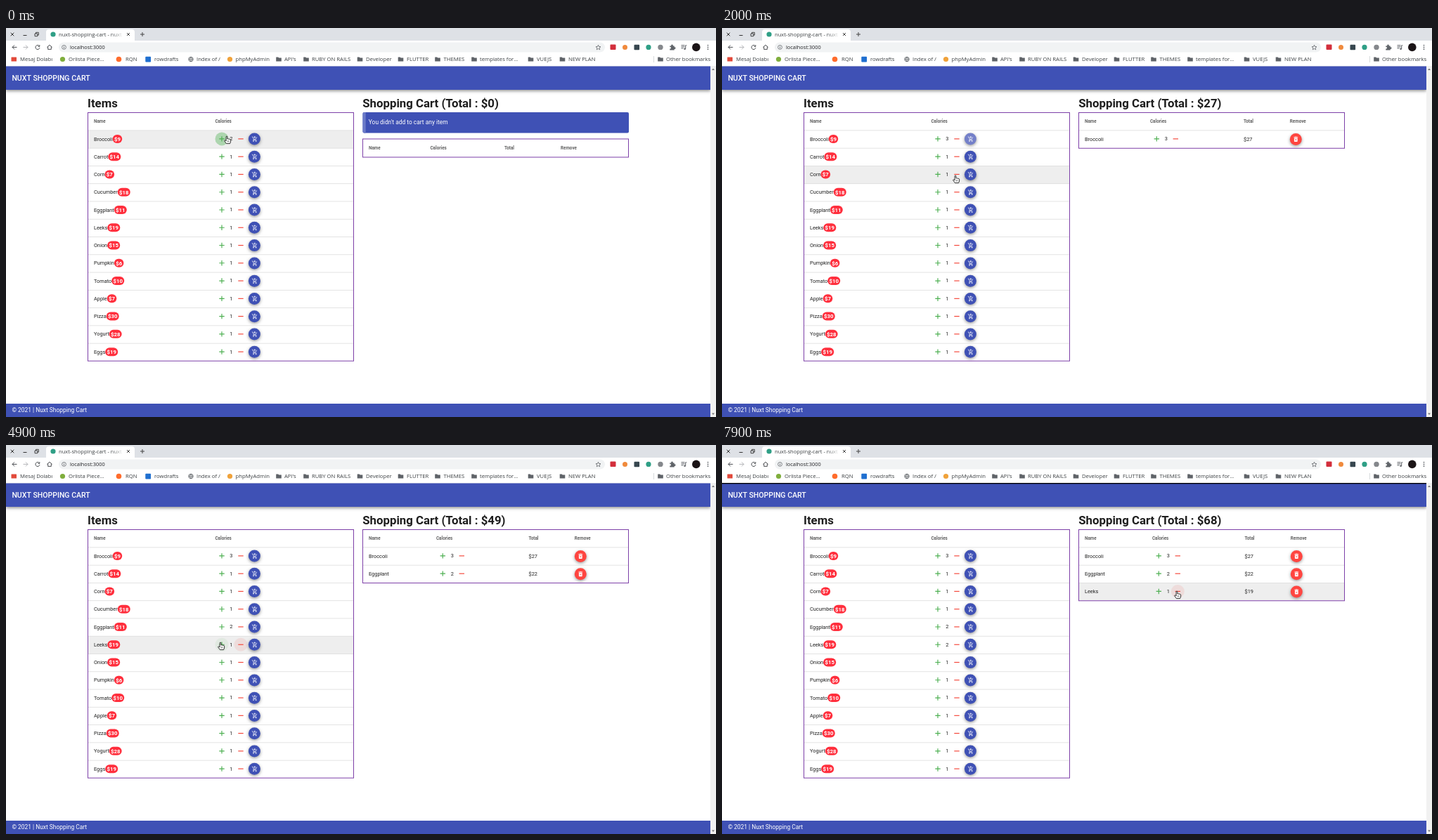
Write an HTML page with a canvas that moves like this. It is 1010 by 554 pixels and loops after 8000 ms.

```html
<!DOCTYPE html>
<html lang="en">
<head>
<meta charset="utf-8">
<title>Shopping cart</title>
<style>
html, body { margin: 0; width: 100%; height: 100%; overflow: hidden; background: #fff; }
canvas { display: block; }
</style>
</head>
<body>
<canvas id="stage" width="1010" height="554"></canvas>
<script>
const ctx = document.getElementById('stage').getContext('2d');
const LOOP = 8000, STEP = 100;
const BLUE = '#3f51b5', LIGHT = '#7480c9', GREEN = '#4caf50', RED = '#f44336';
const INK = '#212121', GREY = '#5f6368';
const PAGE = 'Roboto, sans-serif', UI = '"Open Sans", sans-serif';
const ROW = 25.27, TOP = 146;

const items = [['Broccoli', 9], ['Carrot', 14], ['Corn', 7], ['Cucumber', 18], ['Eggplant', 11],
  ['Leeks', 19], ['Onion', 15], ['Pumpkin', 6], ['Tomato', 10], ['Apple', 7], ['Pizza', 30],
  ['Yogurt', 28], ['Eggs', 19]];

// time, control, row
const clicks = [[-200, 'plus', 0], [400, 'plus', 0], [900, 'add', 0], [2800, 'plus', 4],
  [3200, 'add', 4], [4200, 'minus', 5], [5200, 'plus', 5], [6000, 'add', 5], [7400, 'cartMinus', 2]];
const loads = [1000, 3500, 6100, 7400];

// pointer tip: time, x, y
const path = [[0, 314, 154], [600, 314, 154], [900, 353, 158], [1300, 353, 158], [1700, 349, 173],
  [1800, 346, 184], [2400, 304, 262], [2900, 304, 262], [3200, 351, 260], [3500, 351, 260],
  [3900, 335, 278], [4300, 334, 283], [4500, 334, 283], [4900, 305, 281], [5400, 305, 281],
  [5900, 354, 281], [6100, 354, 281], [6400, 423, 276], [6800, 820, 207], [6900, 820, 207],
  [7200, 647, 208], [8000, 647, 208]];

const rowY = i => 157.9 + ROW * i;

function pointer(t) {
  t = Math.max(0, t);
  const k = path.findIndex(p => p[0] > t);
  const [t0, x0, y0] = path[k - 1], [t1, x1, y1] = path[k];
  const f = (t - t0) / (t1 - t0);
  return { x: x0 + (x1 - x0) * f, y: y0 + (y1 - y0) * f };
}

function rect(x, y, w, h, color) {
  ctx.fillStyle = color;
  ctx.fillRect(x, y, w, h);
}

function round(x, y, w, h, r, color) {
  ctx.fillStyle = color;
  ctx.beginPath();
  ctx.roundRect(x, y, w, h, r);
  ctx.fill();
}

function disc(x, y, r, color) {
  ctx.fillStyle = color;
  ctx.beginPath();
  ctx.arc(x, y, r, 0, 7);
  ctx.fill();
}

function ring(x, y, r, color, w = 0.9) {
  ctx.strokeStyle = color;
  ctx.lineWidth = w;
  ctx.beginPath();
  ctx.arc(x, y, r, 0, 7);
  ctx.stroke();
}

function text(s, x, y, size, color = INK, weight = 400, family = PAGE, align = 'left') {
  ctx.font = `${weight} ${size}px ${family}`;
  ctx.fillStyle = color;
  ctx.textAlign = align;
  ctx.fillText(s, x, y);
}

function shape(d, x, y, scale, { fill, stroke, width = 1 }) {
  const p = new Path2D(d);
  ctx.save();
  ctx.translate(x, y);
  ctx.scale(scale, scale);
  if (fill) { ctx.fillStyle = fill; ctx.fill(p); }
  if (stroke) { ctx.strokeStyle = stroke; ctx.lineWidth = width; ctx.stroke(p); }
  ctx.restore();
}

const line = (d, x, y, color = GREY, width = 1) => shape(d, x, y, 1, { stroke: color, width });

function frame(x, y, w, h) {
  ctx.strokeStyle = '#7d3fa8';
  ctx.lineWidth = 1;
  ctx.strokeRect(x, y, w, h);
}

function shadowed(draw) {
  ctx.save();
  ctx.shadowColor = 'rgba(0,0,0,.4)';
  ctx.shadowBlur = 4;
  ctx.shadowOffsetY = 1.6;
  draw();
  ctx.restore();
}

function folder(x) {
  shape('M-3.8-3h3l1 1h3.6v5h-7.6z', x, 44.6, 1, { fill: GREY });
}

function browser() {
  rect(0, 0, 1010, 18, '#dee1e6');
  rect(0, 18, 1010, 36, '#fff');
  line('M-2.3-2.3l4.6 4.6M2.3-2.3l-4.6 4.6', 9, 9, '#333');
  line('M-2.5 1.5h5', 27, 9, '#333');
  line('M-2.5-1h3.8v3.7h-3.8zM-1-1v-1.7h3.8v3.8h-1.5', 43.5, 9, '#333', 0.9);
  round(57, 2, 126, 18, [4, 4, 0, 0], '#fff');
  disc(67, 9, 3.6, '#2f9f86');
  text('nuxt-shopping-cart - nuxt', 75, 11.7, 7.6, '#3c4043', 400, UI);
  const fade = ctx.createLinearGradient(150, 0, 167, 0);
  fade.addColorStop(0, 'rgba(255,255,255,0)');
  fade.addColorStop(1, '#fff');
  rect(150, 3, 18, 14, fade);
  line('M-2-2l4 4M2-2l-4 4', 174, 9, '#444');
  line('M-3 0h6M0-3v6', 194, 9, '#444');

  line('M3.5 0h-6.5M0-3l-3 3l3 3', 12, 27.4, '#4a4d51');
  line('M-3.5 0h6.5M0-3l3 3l-3 3', 28, 27.4, '#b4b6b9');
  line('M2.3-1.8a3 3 0 1 0 .6 2.6M2.8-3.2v2.2h-2.2', 45, 27.4, '#4a4d51');
  line('M-3.6 0l3.6-3.2l3.6 3.2M-2.3-.8v3.8h4.6v-3.8', 62, 27.4, '#4a4d51');
  round(75, 20.5, 777, 14, 7, '#f1f3f4');
  ring(82.5, 27.4, 2.9, GREY, 0.8);
  line('M0-.4v2M0-1.7v.8', 82.5, 27.4, GREY, 0.8);
  text('localhost:3000', 91, 30, 7.37, '#202124', 400, UI);
  line('M0-3.4l1 2.3l2.5.2l-1.9 1.6l.6 2.5l-2.2-1.3l-2.2 1.3l.6-2.5l-1.9-1.6l2.5-.2z', 842.5, 27.6, GREY, 0.8);
  round(859.5, 23.6, 8, 7.5, 1, '#d32f3c');
  disc(880.5, 27.4, 3.5, '#f08a3c');
  round(893.5, 23.7, 7.6, 7.6, 1, '#37474f');
  disc(914, 27.4, 3.6, '#2f9f86');
  disc(931, 27.4, 3.7, '#85888c');
  shape('M-3.5-2h2a1.3 1.3 0 1 1 2.4 0h2v2a1.3 1.3 0 1 1 0 2.4v1.6h-6.4v-2a1.2 1.2 0 1 0 0-2.2z', 947.8, 27.4, 1, { fill: GREY });
  line('M-3.5-2.7h5M-3.5-.6h5M-3.5 1.5h3M2.7 2.4v-5h1.6', 964, 27.4, GREY, 1);
  disc(2 + 962, 29.3, 0, GREY);
  disc(965.6, 29.8, 1.3, GREY);
  disc(981.8, 27.4, 5.8, '#1b1416');
  for (const y of [24.6, 27.4, 30.2]) disc(998.5, y, 0.85, GREY);

  round(7.5, 41.5, 7.5, 6, 0.5, '#e24a3b');
  disc(80.5, 44.5, 3.6, '#7fae3c');
  disc(160.5, 44.5, 3.8, '#ff6c2c');
  round(198.3, 40.7, 7.8, 7.8, 1, '#1f6fd0');
  ring(263, 44.5, 3.2, GREY, 1);
  line('M-3 0h6M0-3q-3 3 0 6q3-3 0-6', 263, 44.5, GREY, 0.7);
  disc(318.5, 44.5, 3.6, '#f0a23a');
  const marks = [['Mesaj Dolabı', 20], ['Orlista Piece…', 89], ['RQN', 170], ['rowdrafts', 211],
    ['Index of /', 271], ['phpMyAdmin', 326.5], ["API's", 396, 388], ['RUBY ON RAILS', 435, 427],
    ['Developer', 512, 503.5], ['FLUTTER', 570, 561.5], ['THEMES', 622.5, 614],
    ['templates for…', 674, 666], ['VUEJS', 755, 746.5], ['NEW PLAN', 800, 791.5],
    ['Other bookmarks', 939, 931]];
  for (const [name, x, icon] of marks) {
    text(name, x, 47.2, 7.7, '#3c4043', 400, UI);
    if (icon) folder(icon);
  }
  rect(921, 40, 0.8, 9, '#cfd1d4');
}

function page(t) {
  rect(0, 54, 1010, 500, '#fff');
  shadowed(() => rect(0, 54.5, 1002, 33.5, BLUE));
  rect(0, 48, 1010, 6, '#fff');
  text('NUXT SHOPPING CART', 8.4, 75.2, 10.53, '#fff', 500);
  rect(0, 535, 1002, 19, BLUE);
  text('© 2021 | Nuxt Shopping Cart', 8.4, 547.4, 8.42, '#fff');
  for (const start of loads) {
    const dt = t - start;
    if (dt >= 0 && dt < 600) rect(0, 54, 1002 * Math.min(1, (dt + 50) / 150), 1.2, '#000');
  }
  rect(1002, 54, 8, 500, '#f1f1f1');
  shape('M-2 1.2l2-2.4l2 2.4z', 1006, 58.8, 1, { fill: '#777' });
  shape('M-2-1.2l2 2.4l2-2.4z', 1006, 549.8, 1, { fill: '#777' });
}

function plusMinus(x, y, qty, tintPlus, tintMinus) {
  for (const [dx, a, c] of [[0, tintPlus, GREEN], [27, tintMinus, RED]]) {
    ctx.globalAlpha = a;
    disc(x + dx, y, 9.5, c);
    ctx.globalAlpha = 1;
  }
  line('M-3.7 0h7.4M0-3.7v7.4', x, y, GREEN, 1.15);
  text(qty, x + 13.4, y + 2.4, 7.37, INK, 400, PAGE, 'center');
  line('M-3.7 0h7.4', x + 27, y, RED, 1.15);
}

function addButton(x, y, color) {
  shadowed(() => disc(x, y, 8.5, color));
  shape('M1 3h3l4 9h8l4-8M8 12l-2 4h13M12 0v8M8 4h8', x - 3.9, y - 4, 0.36, { stroke: '#fff', width: 2 });
  disc(x - 1.4, y + 3.1, 0.8, '#fff');
  disc(x + 2.3, y + 3.1, 0.8, '#fff');
}

function removeButton(x, y) {
  shadowed(() => disc(x, y, 8.5, '#ff4540'));
  round(x - 2.4, y - 1.9, 4.8, 5.4, 0.7, '#fff');
  rect(x - 2.9, y - 3.2, 5.8, 0.9, '#fff');
  rect(x - 1.2, y - 3.7, 2.4, 0.6, '#fff');
  line('M-1-1l2 2M1-1l-2 2', x, y + 0.8, '#ff4540', 0.8);
}

function headers(labels, xs, y) {
  labels.forEach((s, i) => text(s, xs[i], y, 6.31, 'rgba(0,0,0,.62)', 700));
}

// tint of a round control: hover, focus and the click ripple
function tinter(t, hot) {
  const [when, kind, row] = clicks.filter(c => c[0] < t).pop();
  const dt = t - when;
  return {
    focused: (k, r) => k === kind && r === row,
    tint(k, r, x, y) {
      const hover = Math.hypot(hot.x - x, hot.y - y) < 9.5 ? 0.08 : 0;
      if (k !== kind || r !== row) return hover;
      return 0.1 + 0.3 * Math.max(0, Math.min(1, (400 - dt) / 200));
    }
  };
}

function itemTable(t, hot, state) {
  text('Items', 116, 113.2, 16.8, '#1e1e1e', 700);
  headers(['Name', 'Calories'], [125, 297.5], 135.3);
  const qty = { 0: t < 400 ? 2 : 3, 4: t < 2800 ? 1 : 2, 5: t < 5200 ? 1 : 2 };
  const over = hot.x > 117 && hot.x < 494 ? Math.floor((hot.y - TOP) / ROW) : -1;
  items.forEach(([name, price], i) => {
    const y = rowY(i), top = TOP + ROW * i;
    if (i === over) rect(117, top, 377, ROW, '#eee');
    rect(117, top - 0.5, 377, 0.8, '#dcdcdc');
    text(name, 125, y + 2.6, 7.37);
    const x = 125 + ctx.measureText(name).width;
    ctx.font = `700 7.8px ${PAGE}`;
    const w = ctx.measureText('$' + price).width;
    round(x, y - 6, w + 4.6, 12, 6, '#ff2f3d');
    text('$' + price, x + 2.3, y + 2.8, 7.8, '#fff', 700);
    plusMinus(307, y, qty[i] || 1, state.tint('plus', i, 307, y), state.tint('minus', i, 334, y));
    addButton(353.4, y + 0.1, state.focused('add', i) ? LIGHT : BLUE);
  });
  frame(116.5, 120.5, 378, 353.7);
}

function cartTable(t, hot, state) {
  const cart = [['Broccoli', 3, 9], ['Eggplant', 2, 11], ['Leeks', t < 7400 ? 2 : 1, 19]]
    .slice(0, loads.slice(0, 3).filter(s => t >= s).length);
  const total = cart.reduce((sum, [, n, price]) => sum + n * price, 0);
  const labels = ['Name', 'Calories', 'Total', 'Remove'];
  text(`Shopping Cart (Total : $${total})`, 507.3, 113.2, 16.8, '#1e1e1e', 700);
  if (!cart.length) {
    round(507.5, 120, 378.5, 29.6, 2, BLUE);
    round(507.5, 120, 4.2, 29.6, [2, 0, 0, 2], '#6b7ac8');
    text("You didn't add to cart any item", 515.8, 137.4, 8.42, '#fff');
    headers(labels, [516, 603.5, 709, 789], 173.2);
    frame(507.5, 158, 378, 26);
    return;
  }
  const dx = cart.length > 1 ? 3 : 0;
  headers(labels, [516, 609 + dx, 742 + dx / 2, 807.8 + dx / 3], 135.3);
  const over = hot.x > 508 && hot.x < 885 ? Math.floor((hot.y - TOP) / ROW) : -1;
  cart.forEach(([name, n, price], i) => {
    const y = rowY(i), top = TOP + ROW * i, x = 618.3 + dx;
    if (i === over) rect(508, top, 377, ROW, '#eee');
    rect(508, top - 0.5, 377, 0.8, '#dcdcdc');
    text(name, 516, y + 2.6, 7.37);
    plusMinus(x, y, n, state.tint('cartPlus', i, x, y), state.tint('cartMinus', i, x + 27, y));
    text('$' + n * price, 742 + dx / 2, y + 2.6, 7.37);
    removeButton(816.3 + dx / 3, y + 0.5);
  });
  frame(507.5, 120.5, 378, 25.5 + ROW * cart.length);
}

function cursor(t, { x, y }) {
  const rows = t < 1000 ? 0 : 3;
  const near = (cx, cy, r) => Math.hypot(x - cx, y - cy) < r;
  let hand = items.some((_, i) => near(307, rowY(i), 9.5) || near(334, rowY(i), 9.5) || near(353.4, rowY(i), 9));
  for (let i = 0; i < rows; i++)
    hand = hand || near(621.3, rowY(i), 9.5) || near(648.3, rowY(i), 9.5) || near(817.3, rowY(i), 9);
  if (hand) {
    shape('M-.9.6q.9-1.2 1.8 0v3.4q1-.6 1.6.2q1-.5 1.6.3q1.2-.3 1.5.7v2.8l-1 2.6h-5.2l-2.8-4q.5-1.3 1.6-.4l.9.8z',
      x, y, 1, { fill: '#fff', stroke: '#111', width: 0.85 });
    line('M1.4 6.2v2.4M3 6.2v2.4', x, y, '#111', 0.5);
  } else {
    shape('M0 0v9.6l2.2-2l1.4 3.2l1.6-.7l-1.4-3.1h3z', x, y, 1, { fill: '#111', stroke: '#fff', width: 0.6 });
  }
}

function draw(t) {
  const hot = pointer(t - STEP), state = tinter(t, hot);
  page(t);
  browser();
  for (const s of loads) if (t >= s && t < s + 600) rect(0, 54, 1002 * Math.min(1, (t - s + 50) / 150), 1.2, '#000');
  itemTable(t, hot, state);
  cartTable(t, hot, state);
  cursor(t, pointer(t));
}

const begin = performance.now();
let last = -1;
function tick(now) {
  const t = Math.floor(Math.max(0, now - begin) % LOOP / STEP) * STEP;
  if (t !== last) draw(last = t);
  requestAnimationFrame(tick);
}
draw(0);
requestAnimationFrame(tick);
</script>
</body>
</html>
```
